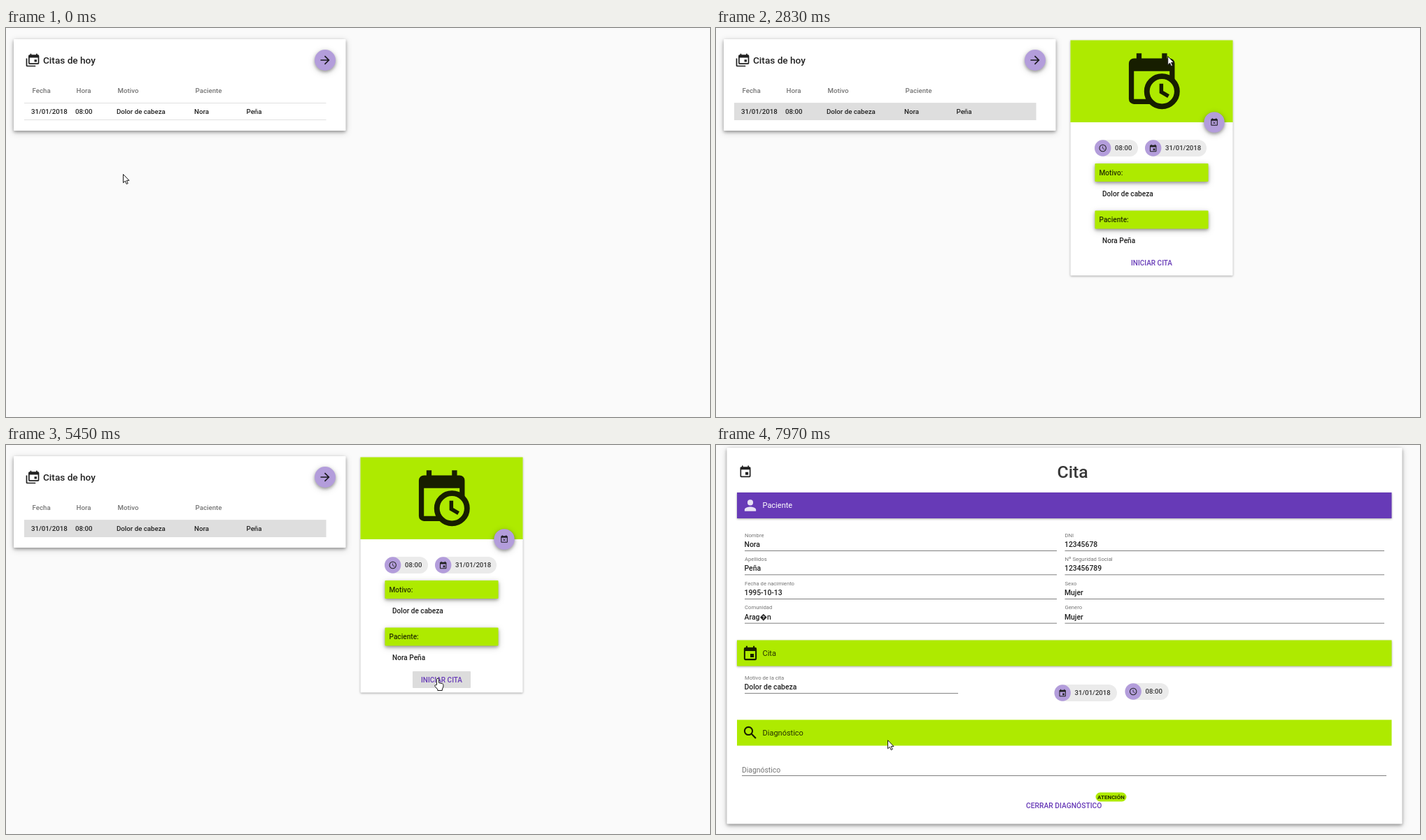
Recreate the animation shown at these times as an HTML page. Size 1006x557 px, loop 8000 ms.

```html
<!DOCTYPE html>
<html lang="es">
<head>
<meta charset="utf-8">
<title>Citas</title>
<style>
  html, body { margin: 0; width: 100%; height: 100%; overflow: hidden; background: #fafafa; }
  svg { display: block; width: 100vw; height: 100vh; font-family: Roboto, sans-serif; }
  text { white-space: pre; }
  .high { filter: drop-shadow(0 2px 2px rgba(0,0,0,.3)) drop-shadow(0 2px 4px rgba(0,0,0,.2)); }
  .low { filter: drop-shadow(0 1px 1.5px rgba(0,0,0,.35)); }
  .line { fill: none; stroke: currentColor; stroke-width: 2; }
</style>
</head>
<body>
<svg id="stage" viewBox="0 0 1006 557"></svg>
<script>
const LOOP = 8000;
const LIME = '#aeea00', LILAC = '#b39ddb', PURPLE = '#673ab7';
const INK = '#212121', ON_LIME = '#171e00', GREY = '#757575';

// Icons live in a 24 x 24 box.
const calendar = 'M6 1h2v2h8V1h2v2h1a2 2 0 0 1 2 2v14a2 2 0 0 1-2 2H5a2 2 0 0 1-2-2V5a2 2 0 0 1 2-2h1zM5 8v11h14V8z';
const solid = d => `<path fill="currentColor" fill-rule="evenodd" d="${d}"/>`;
const stroked = (d, width = 2) => `<path class="line" style="stroke-width:${width}" d="${d}"/>`;
const icons = {
  event: solid(calendar + 'M12 12h5v5h-5z'),
  busy: solid(calendar) + stroked('M8.8 10.5l6 6m0-6l-6 6', 1.5),
  stack: solid('M8 1h2v2h8V1h2v2h1a2 2 0 0 1 2 2v12a2 2 0 0 1-2 2H7a2 2 0 0 1-2-2V5a2 2 0 0 1 2-2h1zM7 8v9h14V8zM15 11h4v4h-4z') +
    stroked('M2 9v12a1 1 0 0 0 1 1h14'),
  planned: solid(calendar) +
    `<circle cx="16" cy="16" r="5.92" fill="${LIME}" stroke="currentColor" stroke-width="2.15"/>` +
    stroked('M15.75 13v3.25l2.8 1.62', 1.5),
  clock: '<circle class="line" cx="12" cy="12" r="9"/>' + stroked('M11.75 7v5.6l4.9 2.95', 1.5),
  arrow: stroked('M4 12h14M11.3 4.7l7.3 7.3-7.3 7.3'),
  search: '<circle class="line" cx="9.5" cy="9.5" r="5.5"/>' + stroked('M13.8 13.8l6 6', 2.1),
  person: solid('M12 4a4 4 0 1 1 0 8a4 4 0 1 1 0-8M12 14c2.67 0 8 1.34 8 4v2H4v-2c0-2.66 5.33-4 8-4')
};
const icon = (name, cx, cy, size, color = INK) =>
  `<g color="${color}" transform="translate(${cx - size / 2} ${cy - size / 2}) scale(${size / 24})">${icons[name]}</g>`;

const rect = (x1, y1, x2, y2, fill, extra = '') =>
  `<rect x="${x1}" y="${y1}" width="${x2 - x1}" height="${y2 - y1}" fill="${fill}" ${extra}/>`;

// Text is centred vertically on y by its capital height.
const label = (x, y, size, str, fill = INK, weight = 500, anchor = 'start') =>
  `<text x="${x}" y="${y}" dy=".355em" font-size="${size}" fill="${fill}" font-weight="${weight}" text-anchor="${anchor}">${str}</text>`;

const fab = (cx, cy, r, name, size) =>
  `<circle class="high" cx="${cx}" cy="${cy}" r="${r}" fill="${LILAC}"/>` + icon(name, cx, cy, size, '#1c1a20');

const chip = (x, cy, width, name, str) =>
  rect(x, cy - 12, x + width, cy + 12, '#ebebeb', 'rx="12"') +
  `<circle cx="${x + 11.7}" cy="${cy}" r="11.7" fill="${LILAC}"/>` +
  icon(name, x + 11.7, cy + (name === 'event' ? .5 : 0), 12.6) +
  label(x + 29, cy, 9.6, str, '#333');

const field = (x1, x2, lineY, name, value) =>
  label(x1, lineY - 22.6, 7.7, name, GREY, 400) +
  label(x1 - .5, lineY - 9.2, 10.4, value) +
  rect(x1, lineY - .5, x2, lineY + .5, '#808080');

const section = (y, name, title, fill, color, iconColor, shadow = 'class="low"') =>
  rect(30, y, 965.5, y + 37, fill, shadow) +
  icon(name, 49, y + (name === 'event' ? 19.5 : 18.5), 24.4, iconColor) +
  label(66.5, y + 18.5, 11, title, color, 400);

const first = 'Nora', last = 'Peña', reason = 'Dolor de cabeza', day = '31/01/2018', hour = '08:00';

const agenda =
  rect(11, 16, 485.5, 147, '#fff', 'class="high" rx="1"') +
  icon('stack', 38, 46, 20.4) + label(53, 46, 13.6, 'Citas de hoy') +
  fab(456, 46, 15, 'arrow', 19.5) +
  [[37.5, 'Fecha'], [100.5, 'Hora'], [159.5, 'Motivo'], [270.5, 'Paciente']]
    .map(([x, str]) => label(x, 89.5, 9.7, str, GREY)).join('') +
  rect(26, 107, 457.5, 108, '#e0e0e0') + rect(26, 131, 457.5, 132, '#e0e0e0') +
  rect(26, 108, 457.5, 131.5, '#dedede', 'id="row"') +
  [[36, day], [99, hour], [158, reason], [269, first], [343.5, last]]
    .map(([x, str]) => label(x, 119.8, 9.7, str)).join('');

const bar = (y, str) =>
  rect(541.5, y, 703.5, y + 26, LIME, 'class="high" rx="1"') + label(547.5, y + 13, 10.1, str, '#263200');

const detail =
  rect(506.5, 17.5, 738.5, 354.5, '#fff', 'class="low" rx="1"') +
  rect(506.5, 17.5, 738.5, 135, LIME) +
  icon('planned', 622.7, 76.2, 87.4, ON_LIME) +
  fab(712, 135, 14.7, 'busy', 12.8) +
  chip(541, 172, 62, 'clock', hour) + chip(613, 172, 88, 'event', day) +
  bar(194, 'Motivo:') + label(552, 237, 10.1, reason) +
  bar(261.5, 'Paciente:') + label(552, 304, 10.1, first + ' ' + last) +
  rect(581, 324, 664, 348, '#dcdcdc', 'id="button" rx="1"') +
  label(622.5, 336, 10, 'INICIAR CITA', PURPLE, 500, 'middle');

const fieldLines = [151.5, 185.8, 220.5, 255.2, 355.6];
const leftFields = [['Nombre', first], ['Apellidos', last], ['Fecha de nacimiento', '1995-10-13'], ['Comunidad', 'Arag\uFFFDn']];
const rightFields = [['DNI', '12345678'], ['Nº Seguridad Social', '123456789'], ['Sexo', 'Mujer'], ['Genero', 'Mujer']];
const fieldEnd = i => i < 4 ? 487 : 346;

const visit =
  rect(15.5, 4, 980.5, 542.5, '#fff', 'class="high" rx="1"') +
  icon('event', 42, 38.7, 20) + label(509.7, 38.5, 24.8, 'Cita', '#383838', 500, 'middle') +
  section(68, 'person', 'Paciente', PURPLE, '#fff', '#e8e1f4') +
  leftFields.map((f, i) => field(41, 487, fieldLines[i], ...f)).join('') +
  rightFields.map((f, i) => field(498.5, 955, fieldLines[i], ...f)).join('') +
  section(279.5, 'event', 'Cita', LIME, '#263200', ON_LIME) +
  field(41, 346, fieldLines[4], 'Motivo de la cita', reason) +
  chip(483.5, 355, 89.5, 'event', day) + chip(584.5, 353, 62.5, 'clock', hour) +
  section(393.5, 'search', 'Diagnóstico', LIME, '#263200', ON_LIME, '') +
  label(37, 465, 10.4, 'Diagnóstico', GREY, 400) + rect(37, 473, 958, 474, '#808080') +
  label(443, 516, 10.3, 'CERRAR DIAGNÓSTICO', PURPLE) +
  rect(542.5, 497.5, 586.5, 510.5, LIME, 'rx="6.5"') +
  label(564.5, 504.2, 8, 'ATENCIÓN', '#263200', 700, 'middle') +
  fieldLines.map((y, i) => rect(41, y - 1, fieldEnd(i), y + 1, INK, 'class="hover"')).join('');

const stage = document.getElementById('stage');
stage.innerHTML =
  `<g id="agenda">${agenda}</g><g id="detail">${detail}</g><g id="visit">${visit}</g>
  <circle id="click" r="8.7" fill="#f2ee20" opacity=".82"/>
  <g id="pointer" fill="#fff" stroke="#1a1a1a" stroke-linejoin="round">
    <path id="arrow" d="M.5 .5V12.6l2.8-2.6 1.9 4.4 2-.9-1.9-4.2h3.7z"/>
    <path id="hand" d="M-1.5 9V1.7a1.5 1.5 0 0 1 3 0V6.5l5 1.2a1.8 1.8 0 0 1 1.4 1.8V12l-1.6 4v1.5h-6.5V16L-4 11.6a1.2 1.2 0 0 1 1.8-1.6z"/>
  </g>`;
const el = id => document.getElementById(id);
const hoverLines = [...stage.querySelectorAll('.hover')];
const show = (id, on) => el(id).style.display = on ? '' : 'none';
const clamp = v => Math.min(1, Math.max(0, v));

// Pointer moves: start, end, then a quadratic curve from, control, to.
const moves = [
  [20, 820, [167, 209], [160, 164.5], [153, 120.5]],
  [1550, 2350, [153, 120.5], [316, 349], [485, 138]],
  [2350, 3150, [485, 138], [737, -66], [594, 138]],
  [3160, 3970, [594, 138], [603, 326], [618, 325]],
  [3970, 4000, [618, 325], [617.5, 330], [617, 334]],
  [5640, 6590, [362, 73], [362, 73], [362, 73]],
  [6590, 7390, [362, 73], [330, 172], [296, 275]],
  [7410, 8210, [296, 275], [260, 380], [223, 485]]
];

function pointerAt(t) {
  const [start, end, from, control, to] = moves.filter(m => t >= m[0]).pop() || moves[0];
  const u = clamp((t - start) / (end - start)), v = 1 - u;
  return [0, 1].map(k => v * v * from[k] + 2 * u * v * control[k] + u * u * to[k]);
}

function draw(t) {
  const [x, y] = pointerAt(t);
  const onVisit = t >= 5640;
  const onButton = t >= 4000 && !onVisit;

  show('agenda', !onVisit);
  show('detail', t >= 1190 && !onVisit);
  show('visit', onVisit);
  show('row', t >= 1140 || y < 131);
  el('button').setAttribute('opacity', onButton ? 1 - (1 - clamp((t - 3980) / 320)) ** 2 : 0);

  hoverLines.forEach((line, i) => {
    const depth = (y - fieldLines[i] + 27) / 27;
    const inside = depth >= 0 && depth <= 1 && x < fieldEnd(i);
    line.setAttribute('opacity', inside ? depth * .5 : 0);
  });

  show('click', (t >= 1140 && t < 1240) || (t >= 5330 && t < 5450));
  el('click').setAttribute('cx', x + .3);
  el('click').setAttribute('cy', y + .3);
  show('hand', onButton);
  show('arrow', !onButton);
  el('pointer').setAttribute('transform', `translate(${x} ${y})`);
}

const origin = performance.now();
function tick() {
  draw((performance.now() - origin) % LOOP);
  requestAnimationFrame(tick);
}
tick();
</script>
</body>
</html>
```
